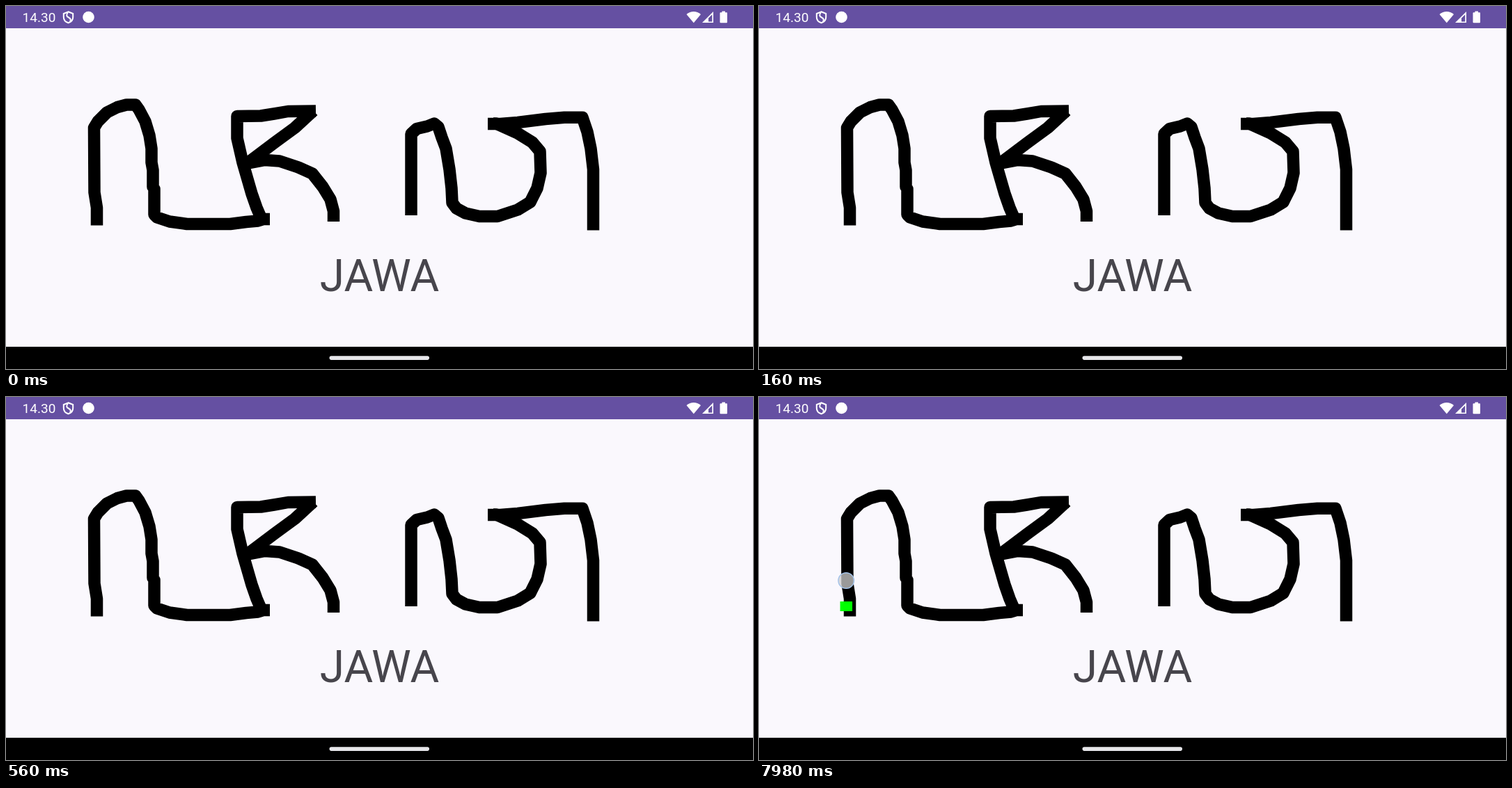
Recreate the animation shown at these times as an HTML page. Size 1073x522 px, loop 8 s.

```html
<!DOCTYPE html>
<html lang="jv">
<head>
<meta charset="utf-8">
<title>Jawa</title>
<style>
  html, body {
    margin: 0;
    width: 100%;
    height: 100%;
    overflow: hidden;
    background: #faf8fd;
  }
  svg { display: block; width: 100%; height: 100%; }
  text { font-family: Roboto, sans-serif; }
  .ink { fill: none; stroke: #000; stroke-width: 17.5; stroke-linejoin: round; }
  .touch { animation: drag 8s step-end infinite; }
  .trail { animation: trace 8s step-end infinite; }

  /* The finger rests, then starts to move up the first stroke. */
  @keyframes drag {
    0% { opacity: 0; transform: translateY(308px); }
    94.375% { opacity: 1; transform: translateY(308px); }
    94.875% { opacity: 1; transform: translateY(310px); }
    99% { opacity: 1; transform: translateY(301px); }
    99.375% { opacity: 1; transform: translateY(284px); }
    99.75%, 100% { opacity: 1; transform: translateY(264px); }
  }
  @keyframes trace {
    0% { opacity: 0; }
    99.75%, 100% { opacity: 1; }
  }
</style>
</head>
<body>
<svg viewBox="0 0 1073 522" preserveAspectRatio="none">
  <rect width="1073" height="522" fill="#faf8fd"/>

  <!-- status bar -->
  <rect width="1073" height="32" fill="#6550a2"/>
  <g fill="#fff">
    <text x="23.6" y="23.4" font-size="19">14.30</text>
    <g fill="none" stroke="#fff" stroke-width="2">
      <path d="M89.5 8.3L96.2 11V16C96.2 20 93.5 23 89.5 24.2C85.5 23 82.8 20 82.8 16V11Z"/>
      <path d="M89 9C86 13 87 15 90 16.5C93 18 93.5 20 92 22.5"/>
    </g>
    <circle cx="118.5" cy="16" r="8.3"/>
    <path d="M977.5 12C983.5 6.7 992 6.7 998 12L987.8 24.2Z"/>
    <path d="M1016 8V24H1000ZM1014.3 12.2L1009 17.5V22.4H1014.3Z" fill-rule="evenodd"/>
    <path d="M1028.5 7.5H1033V9.3H1035.2Q1036 9.3 1036 10.2V23.2Q1036 24.2 1035 24.2H1026.5Q1025.5 24.2 1025.5 23.2V10.2Q1025.5 9.3 1026.4 9.3H1028.5Z"/>
  </g>

  <!-- letters -->
  <g class="ink">
    <path d="M130.5 315.5V290L127 268L126.5 175L132 166L145 153L160 145.5L173 142H186L191 149L200 166L206 186L209 205V225L211 236V260L213 263V300L217 304L235 310L260 313.5H322L345 310.5L362 309L370 306.5H379"/>
    <path d="M366 304L360 290L353 270L340 225L332 190V158.5L366 158L385 155L405 151.5L445 151"/>
    <path d="M441.5 150.5L415 175L385 197L348 225"/>
    <path d="M343 227L372 221.5L393 223L420 232L440 241L455 260L466 278L470.5 295V310"/>
    <path d="M582 301V184L590 176.5L605 173L615 169L621 174L626 189L632 205L637 235L640 262L641 283L647 291L660 298L680 302.5H706L735 293L753 282L763 262L768 240L767 209L756 196L735 183L704 169H700"/>
    <path d="M692 169.5H710L735 167.5L775 162.5L802 160.3H828L835 181L840 205L843.5 235V322.5"/>
  </g>
  <text x="536.5" y="409.5" font-size="64" text-anchor="middle" fill="#47454c">JAWA</text>

  <!-- drawing -->
  <path class="trail" d="M125.3 308V294" stroke="#0f0" stroke-width="17.5"/>
  <circle class="touch" cx="125.2" cy="0" r="11.3" fill="#cdcdcd" fill-opacity=".75" stroke="#a3c3ea" stroke-width="1.4"/>

  <!-- navigation bar -->
  <rect y="490" width="1073" height="32"/>
  <rect x="464.5" y="503.3" width="143.5" height="5.6" rx="2.8" fill="#e6e6ea"/>
</svg>
</body>
</html>
```
